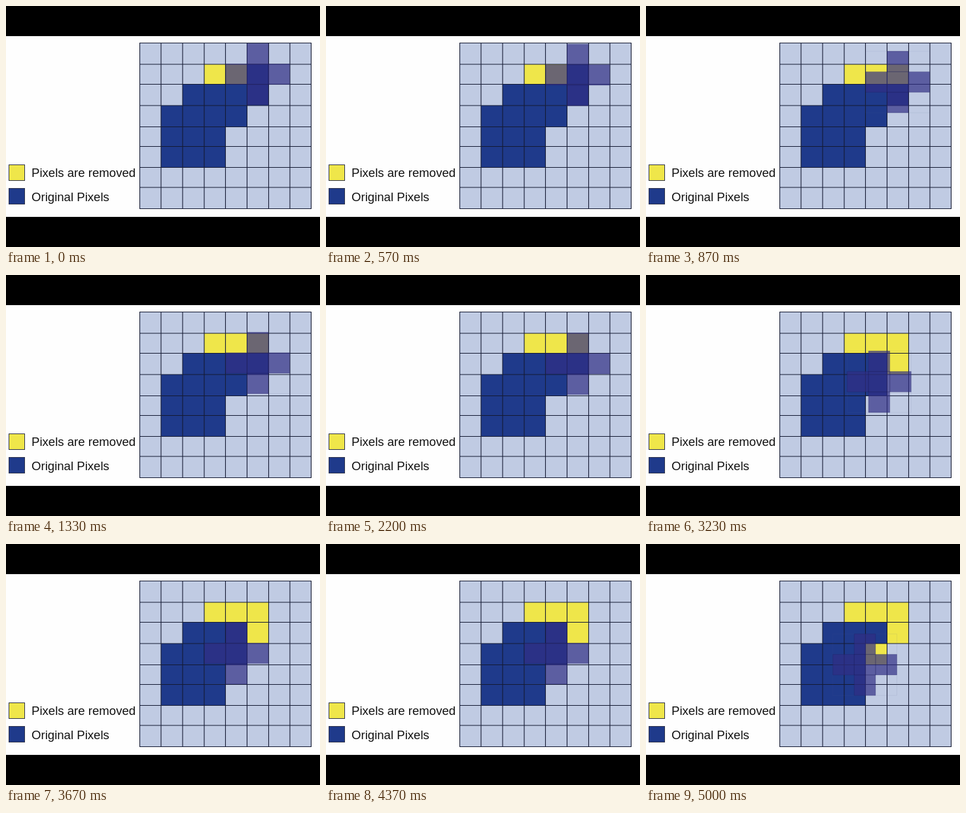
These frames come from a looping animation (480x368 px, 5030 ms). An HTML page with a canvas:

```html
<!DOCTYPE html>
<html lang="en">
<head>
<meta charset="utf-8">
<title>Pixel erosion</title>
<style>
  html, body { margin: 0; width: 100%; height: 100%; overflow: hidden; background: #000; }
  canvas, svg { position: absolute; left: 0; top: 0; display: block; }
  text { font: 18.6px "Liberation Sans", Arial, sans-serif; fill: #111; }
</style>
</head>
<body>
<canvas id="stage" width="480" height="368"></canvas>
<svg width="480" height="368">
  <text x="39" y="261">Pixels are removed</text>
  <text x="39" y="298">Original Pixels</text>
</svg>
<script>
const ctx = document.getElementById('stage').getContext('2d');

const LOOP = 5030;
const STEP = 2015;     // time between two moves
const START = 448;     // first move begins
const MOVE = 1000;     // length of a move
const REMOVE = 372;    // delay from move start to the cell turning yellow

const LIGHT = '#c0cbe3', BLUE = '#1f3a8b', YELLOW = '#efe64a', LINE = '#141a33';

const xs = [204.5, 237, 270, 303, 335.5, 368.5, 401.5, 434, 466.5];
const ys = [56.5, 89, 119.5, 152, 184.5, 214.5, 246.5, 277, 309.5];

// [row, first column, last column]
const shape = [[1, 5, 5], [2, 2, 5], [3, 1, 4], [4, 1, 3], [5, 1, 3]];
const removedBefore = [[3, 1], [4, 1]];
const removedByMove = [[5, 1], [5, 2], [4, 3]];

// Top left corner of the cross's centre cell at each stop
const stops = [[368.5, 88.5], [368.5, 119.8], [336, 151.3], [303, 183.6]];
const CW = 32.6, CH = 31.3;
const arms = [[0, 0], [0, -1], [-1, 0], [1, 0], [0, 1]];

function cell(col, row, color) {
  ctx.fillStyle = color;
  ctx.fillRect(xs[col], ys[row], xs[col + 1] - xs[col], ys[row + 1] - ys[row]);
}

function swatch(y, color) {
  ctx.fillStyle = color;
  ctx.fillRect(4.5, y, 24, 24);
  ctx.strokeStyle = '#30344a';
  ctx.lineWidth = 1;
  ctx.strokeRect(4.5, y, 24, 24);
}

function gridLines() {
  ctx.strokeStyle = LINE;
  ctx.lineWidth = 1.1;
  ctx.beginPath();
  for (const x of xs) { ctx.moveTo(x, ys[0] - 0.5); ctx.lineTo(x, ys[8] + 0.5); }
  for (const y of ys) { ctx.moveTo(xs[0] - 0.5, y); ctx.lineTo(xs[8] + 0.5, y); }
  ctx.stroke();
}

function progress(t, i) {
  const u = Math.min(1, Math.max(0, (t - START - i * STEP) / MOVE));
  return (1 - Math.cos(Math.PI * u)) / 2;
}

function crossAt(t) {
  let [x, y] = stops[0];
  for (let i = 0; i < 3; i++) {
    const p = progress(t, i);
    x += p * (stops[i + 1][0] - stops[i][0]);
    y += p * (stops[i + 1][1] - stops[i][1]);
  }
  return [x, y];
}

function drawCross(x, y) {
  ctx.lineWidth = 1;
  ctx.strokeStyle = 'rgba(90, 100, 150, 0.1)';
  ctx.strokeRect(x - CW, y - CH, 3 * CW, 3 * CH);

  ctx.fillStyle = 'rgba(48, 46, 133, 0.69)';
  ctx.beginPath();
  for (const [dx, dy] of arms) ctx.rect(x + dx * CW, y + dy * CH, CW, CH);
  ctx.fill();
  ctx.strokeStyle = 'rgba(30, 30, 90, 0.25)';
  ctx.stroke();
}

function draw(t) {
  ctx.fillStyle = '#000';
  ctx.fillRect(0, 0, 480, 368);
  ctx.fillStyle = '#fefefe';
  ctx.fillRect(0, 46, 480, 276);
  swatch(242.5, YELLOW);
  swatch(278.5, BLUE);

  ctx.fillStyle = LIGHT;
  ctx.fillRect(xs[0], ys[0], xs[8] - xs[0], ys[8] - ys[0]);
  for (const [row, from, to] of shape)
    for (let col = from; col <= to; col++) cell(col, row, BLUE);
  for (const [col, row] of removedBefore) cell(col, row, YELLOW);
  removedByMove.forEach(([col, row], i) => {
    if (t >= START + i * STEP + REMOVE) cell(col, row, YELLOW);
  });
  gridLines();
  drawCross(...crossAt(t));
}

const begin = performance.now();
function tick() {
  draw((performance.now() - begin) % LOOP);
  requestAnimationFrame(tick);
}
tick();
</script>
</body>
</html>
```
